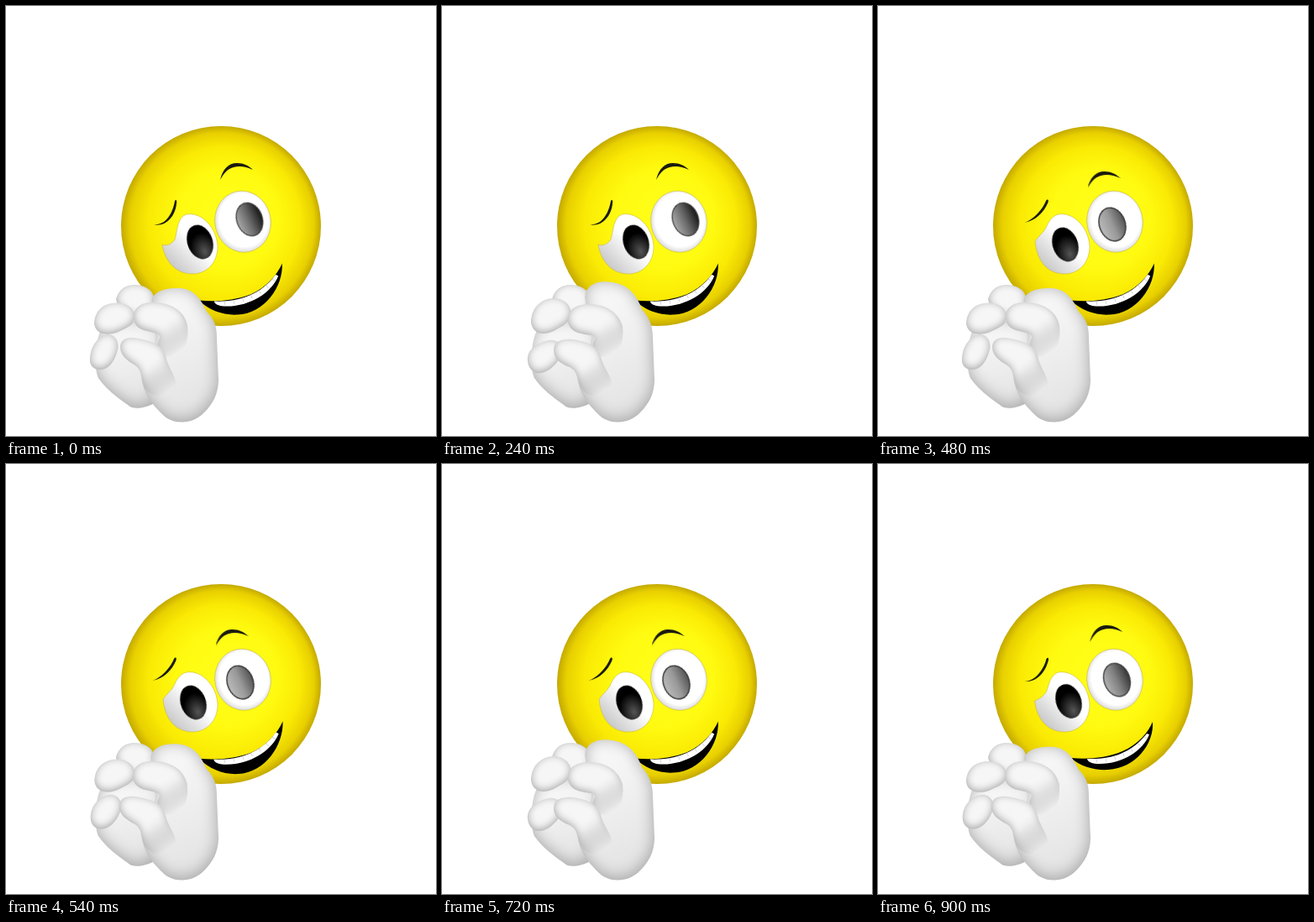
These frames come from a looping animation (512x512 px, 960 ms). An HTML page without scripts:

```html
<!DOCTYPE html>
<html lang="en">
<head>
<meta charset="utf-8">
<title>Hopeful smiley</title>
<style>
  html, body { margin: 0; width: 100%; height: 100%; overflow: hidden; background: #fff; }
  svg { display: block; width: 100vw; height: 100vh; }

  /* Every easing is a staircase of 60 ms holds between pose a and pose b. */
  .look, .glance, .lighten { animation: morph 960ms infinite linear(0 0% 31.25%, .5 31.25% 37.5%, 1 37.5% 93.75%, .5 93.75% 100%); }
  .glance { animation-name: slide; }
  .lighten { animation-name: appear; }
  .grin { animation: morph 480ms infinite linear(.6 0% 12.5%, .85 12.5% 25%, 1 25% 50%, .6 50% 62.5%, .25 62.5% 75%, 0 75% 100%); }
  .curl { animation: morph 480ms infinite linear(0 0% 12.5%, .4 12.5% 25%, .8 25% 37.5%, 1 37.5% 75%, .95 75% 87.5%, .4 87.5% 100%); }
  .lift { animation: morph 480ms infinite linear(.1 0% 12.5%, .4 12.5% 25%, .8 25% 37.5%, 1 37.5% 62.5%, .5 62.5% 75%, 0 75% 100%); }
  .look, .grin, .curl, .lift { d: var(--a); }
  @keyframes morph { from { d: var(--a); } to { d: var(--b); } }
  @keyframes slide { from { transform: none; } to { transform: var(--by); } }
  @keyframes appear { from { opacity: 0; } to { opacity: 1; } }

  .hand path { fill: #f6f6f6; filter: url(#puff); }
  .hand .palm { fill: url(#palm); filter: url(#round); }
  .hand .joined { fill: url(#joined); }
</style>
</head>
<body>
<svg viewBox="0 0 512 512">
  <defs>
    <radialGradient id="skin" fx=".57" fy=".43">
      <stop offset="0" stop-color="#ffff1c"/>
      <stop offset=".5" stop-color="#fffa10"/>
      <stop offset=".76" stop-color="#faea04"/>
      <stop offset=".92" stop-color="#e8d000"/>
      <stop offset="1" stop-color="#c4a900"/>
    </radialGradient>
    <radialGradient id="white" cx=".52" cy=".48" r=".54">
      <stop offset=".8" stop-color="#fff"/>
      <stop offset="1" stop-color="#d6d6d6"/>
    </radialGradient>
    <linearGradient id="shaded" x1=".75" y1=".2" x2=".15" y2=".85">
      <stop offset=".35" stop-color="#fff"/>
      <stop offset="1" stop-color="#c8c8c8"/>
    </linearGradient>
    <linearGradient id="iris" x1="0" y1=".6" x2="1" y2=".5">
      <stop offset="0" stop-color="#aaa"/>
      <stop offset=".5" stop-color="#666"/>
      <stop offset="1" stop-color="#161616"/>
    </linearGradient>
    <linearGradient id="litIris" x1="0" y1=".6" x2="1" y2=".5">
      <stop offset="0" stop-color="#bbb"/>
      <stop offset=".5" stop-color="#999"/>
      <stop offset="1" stop-color="#555"/>
    </linearGradient>
    <radialGradient id="darkIris" cx=".55" cy=".8" r=".55">
      <stop offset="0" stop-color="#555"/>
      <stop offset="1" stop-color="#000"/>
    </radialGradient>
    <linearGradient id="palm" x2=".25" y2="1">
      <stop offset=".25" stop-color="#f6f6f6"/>
      <stop offset="1" stop-color="#e4e4e4"/>
    </linearGradient>
    <linearGradient id="joined" x1=".2" y1=".1" x2=".8" y2="1">
      <stop offset=".5" stop-color="#f6f6f6"/>
      <stop offset=".95" stop-color="#f6f6f6" stop-opacity="0"/>
    </linearGradient>
    <filter id="puff" color-interpolation-filters="sRGB">
      <feGaussianBlur in="SourceAlpha" stdDeviation="5"/>
      <feOffset dx="-.5" dy="-2" result="core"/>
      <feFlood flood-color="#a6a6a6"/>
      <feComposite operator="out" in2="core"/>
      <feComposite operator="atop" in2="SourceGraphic"/>
    </filter>
    <filter id="round" color-interpolation-filters="sRGB">
      <feGaussianBlur in="SourceAlpha" stdDeviation="9"/>
      <feOffset dx="-1" dy="-3" result="core"/>
      <feFlood flood-color="#a6a6a6"/>
      <feComposite operator="out" in2="core"/>
      <feComposite operator="atop" in2="SourceGraphic"/>
    </filter>
  </defs>

  <circle cx="256" cy="262" r="119" fill="url(#skin)"/>

  <g id="brows" fill="#1b1b10">
    <path class="look" style="--a:path('M175 260C188 262 198 250 201 232C202 230 204 231 203 235C202 250 190 264 175 260Z');--b:path('M174 258C184 255 195 244 200 232C202 229 204 231 202 235C196 248 186 256 174 258Z')"/>
    <path class="glance" style="--by:translate(-5.5px,10px)" d="M255 207C258 194 265 187 275 187C283 187 289 190 294 195C285 191 278 190 271 192C263 194 259 200 255 207Z"/>
  </g>

  <g id="eyes">
    <path class="look" fill="url(#shaded)" stroke="#c9b840" stroke-width=".6" style="--a:path('M186 284C191 286 197 284 201 278C204 268 204 251 215 248C233 245 251 264 252 286C252 306 239 319 222 319C202 319 189 304 186 284Z');--b:path('M187 280C190 275 196 271 200 264C203 257 207 250 215 248C233 245 251 264 252 286C252 306 239 319 222 319C202 319 189 304 187 280Z')"/>
    <ellipse cx="282" cy="256.7" rx="33.3" ry="36.7" transform="rotate(-12 282 256.7)" fill="url(#white)" stroke="#c9b840" stroke-width=".6"/>
    <g class="glance" style="--by:translate(-8px,3px)">
      <ellipse cx="231" cy="281" rx="15" ry="21" transform="rotate(-20 231 281)" fill="url(#darkIris)"/>
    </g>
    <g class="glance" style="--by:translate(-11px,6px)">
      <g transform="rotate(-20 290 254)" stroke="#3a3a3a" stroke-width="1.2">
        <ellipse cx="290" cy="254" rx="15.2" ry="20.2" fill="url(#iris)"/>
        <ellipse class="lighten" cx="290" cy="254" rx="15.2" ry="20.2" fill="url(#litIris)"/>
      </g>
    </g>
  </g>

  <g id="mouth">
    <path class="grin" style="--a:path('M327 307C322 319 310 334 291 342C272 350 250 352 230 350C240 360 258 365 274 364C307 362 329 333 327 307Z');--b:path('M330 306C324 320 311 335 292 344C272 351 250 353 230 351C242 364 260 371 277 370C309 368 331 335 330 306Z')"/>
    <path class="grin" fill="#fff" style="--a:path('M249 351C277 352 301 345 320 321L323 322C316 341 291 357 264 357C255 357 250 355 249 351Z');--b:path('M247 352C276 353 303 345 322 319L325 321C316 342 291 357 263 358C253 358 248 356 247 352Z')"/>
    <path d="M250 354C278 354 303 346 322 322" fill="none" stroke="#999" stroke-width="5" stroke-dasharray="1 10" stroke-dashoffset="-10" opacity=".4"/>
  </g>

  <g class="hand" id="far-hand">
    <path d="M131 349C134 336 145 331 155 332C166 333 174 338 176 346L174 372C160 376 133 364 131 349Z"/>
    <path class="palm" d="M114 384C136 370 172 372 190 392L176 473C168 478 152 482 145 475C132 466 119 456 110 443C104 430 106 398 114 384Z"/>
    <path class="lift" style="--a:path('M105 379C105 363 116 354 131 354C144 354 154 360 153 372C152 382 140 385 132 389C120 393 107 391 105 379Z');--b:path('M106 377C106 360 117 349 132 348C145 348 155 356 153 368C152 378 141 382 133 387C120 393 108 390 106 377Z')"/>
    <path class="curl" style="--a:path('M100 419C101 404 111 391 122 391C132 392 136 402 132 413C128 426 120 434 110 433C103 432 99 427 100 419Z');--b:path('M102 418C103 408 114 401 127 398C139 396 146 406 141 418C135 429 124 438 114 437C106 436 101 428 102 418Z')"/>
  </g>

  <g class="hand" id="near-hand">
    <path class="palm lift" style="--a:path('M174 350C178 338 196 336 211 337C227 340 233 352 239 364C248 373 251 381 251 395L253 445C253 462 246 474 236 484C222 499 198 499 186 486C172 472 162 460 161 436C161 420 178 412 178 395Z');--b:path('M170 346C172 331 186 326 203 329C222 332 232 344 238 361C247 371 251 381 251 395L253 445C253 462 246 474 236 484C222 499 198 499 186 486C172 472 162 460 161 436C161 420 178 412 178 395Z')"/>
    <path class="joined curl" style="--a:path('M152 371C152 357 163 352 178 353C196 354 212 362 216 380C218 398 214 412 201 417C188 421 176 410 182 398C186 392 180 390 172 388C160 386 152 381 152 371Z');--b:path('M150 374C150 360 161 355 176 355C194 355 210 364 215 381C217 398 213 412 200 417C187 421 175 410 181 399C185 393 178 392 170 391C158 389 150 384 150 374Z')"/>
    <path class="joined curl" style="--a:path('M136 406C136 396 146 393 158 396C174 399 188 405 190 417C194 434 206 444 202 458C196 469 170 469 163 450C160 440 162 434 154 428C144 422 136 416 136 406Z');--b:path('M133 410C133 399 143 396 156 397C172 399 187 406 189 418C193 434 206 444 202 458C196 469 170 469 163 450C160 440 161 435 152 430C141 426 133 420 133 410Z')"/>
  </g>
</svg>
</body>
</html>
```
